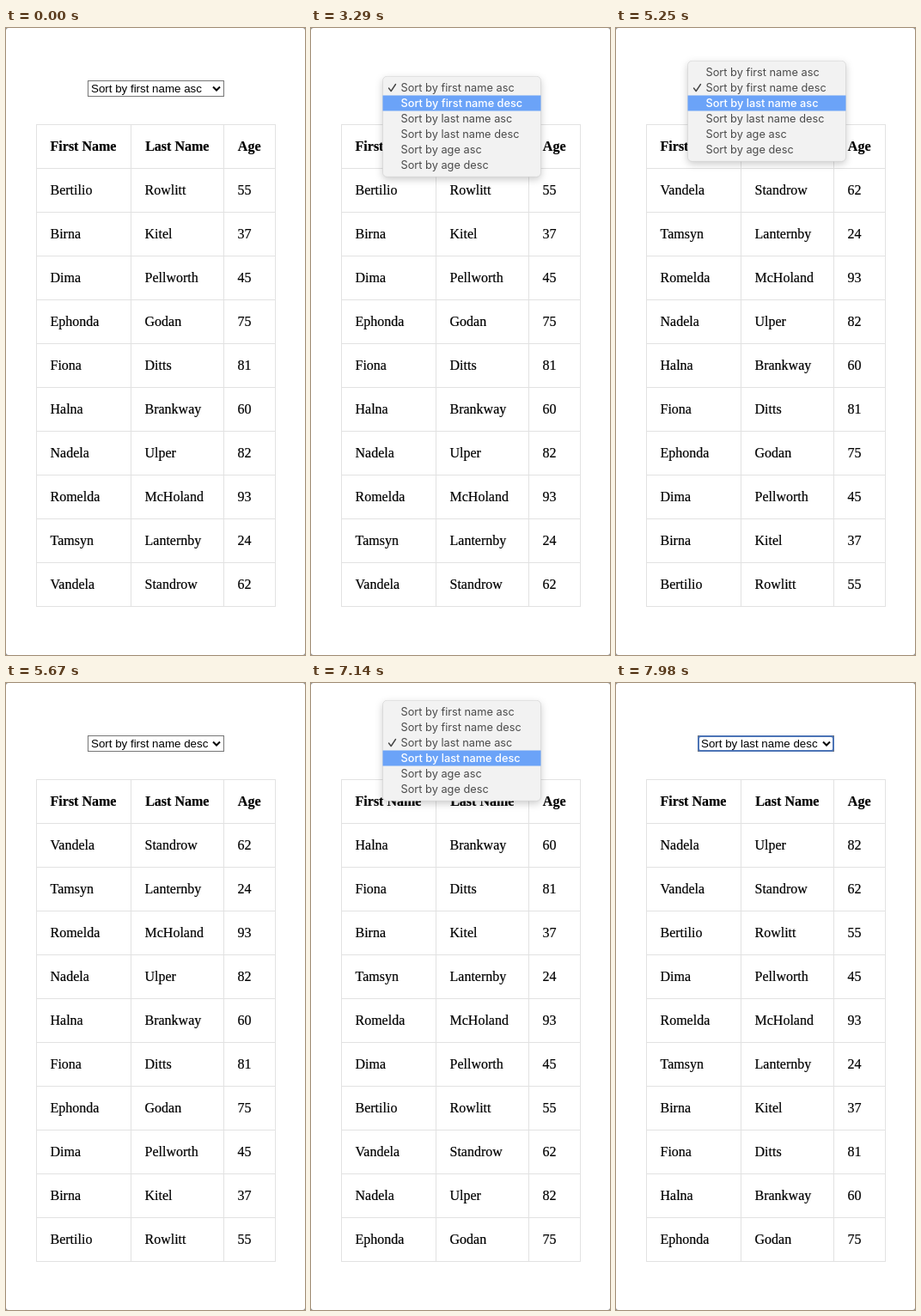
An HTML page that plays this animation: 348x730 px, repeating every 8000 ms.

```html
<!DOCTYPE html>
<html lang="en">
<head>
<meta charset="utf-8">
<title>Sortable table</title>
<style>
  html, body { margin: 0; width: 100%; height: 100%; overflow: hidden; background: #8a8a8a; }
  svg { display: block; width: 348px; height: 730px; }
  .table { font: 16px "Liberation Serif", "Times New Roman", serif; }
  .table text { stroke: #000; stroke-width: .2; }
  .head { font-weight: bold; text-anchor: middle; }
  .grid { fill: none; stroke: #e2e2e2; }
  .select { font: 13.333px "Liberation Sans", Arial, sans-serif; }
  .box { fill: #fff; stroke: #767676; }
  .hover .box { stroke: #4f4f4f; }
  .ring { fill: none; stroke: #4c74b6; stroke-width: 2; visibility: hidden; }
  .focus .ring { visibility: visible; }
  .menu { font: 12.78px Inter, "Open Sans", sans-serif; }
  .panel { fill: #f2f2f2; stroke: #c9c9c9; stroke-width: .5;
    filter: drop-shadow(0 3px 4px rgba(0, 0, 0, .2)); }
  .item rect { fill: none; }
  .item text { fill: #4b4b4b; }
  .item path { fill: none; stroke: #444; stroke-width: 1.4; visibility: hidden;
    stroke-linecap: round; stroke-linejoin: round; }
  .item.checked path { visibility: visible; }
  .item.on rect { fill: #6ba3f8; }
  .item.on text { fill: #fff; font-weight: 500; }
  .item.on path { stroke: #fff; }
</style>
</head>
<body>
<svg id="stage" viewBox="0 0 348 730"></svg>
<script>
const LOOP = 8000, STEP = 70, ROW = 51, ITEM = 18;
const COLUMNS = [51.5, 161.5, 269.5];

// Listed by first name, ascending.
const people = [
  ['Bertilio', 'Rowlitt', 55],
  ['Birna', 'Kitel', 37],
  ['Dima', 'Pellworth', 45],
  ['Ephonda', 'Godan', 75],
  ['Fiona', 'Ditts', 81],
  ['Halna', 'Brankway', 60],
  ['Nadela', 'Ulper', 82],
  ['Romelda', 'McHoland', 93],
  ['Tamsyn', 'Lanternby', 24],
  ['Vandela', 'Standrow', 62]
];

const labels = ['first name', 'last name', 'age']
  .flatMap(key => ['asc', 'desc'].map(dir => `Sort by ${key} ${dir}`));

// One person always stays at the end when sorting by last name.
const pinned = people[3];
const byLast = people.filter(p => p !== pinned).sort((a, b) => a[1] < b[1] ? -1 : 1);
// The last-name order follows the shown table, where Kitel precedes Lanternby.
const orders = [
  people,
  [...people].reverse(),
  [...byLast, pinned],
  [...byLast].reverse().concat([pinned])
];

// Each visit to the menu moves the choice from one entry to the next.
const visits = [
  { open: 1820, move: 2240, pick: 3430, closed: 3780 },
  { open: 4480, move: 4760, pick: 5390, closed: 5670 },
  { open: 6720, move: 7140, pick: 7630, closed: 7910 }
];

const stage = document.getElementById('stage');

function add(parent, tag, attrs = {}, text = '') {
  const el = document.createElementNS('http://www.w3.org/2000/svg', tag);
  for (const name in attrs) el.setAttribute(name, attrs[name]);
  el.textContent = text;
  return parent.appendChild(el);
}

add(stage, 'rect', { width: 348, height: 730, rx: 3, fill: '#fff' });

const table = add(stage, 'g', { class: 'table' });
let grid = '';
for (let i = 0; i < 12; i++) grid += `M35 ${112.5 + i * ROW}H314`;
for (const x of [35.5, 145.5, 253.5, 313.5]) grid += `M${x} 112V674`;
add(table, 'path', { class: 'grid', d: grid });
[['First Name', 90], ['Last Name', 199.3], ['Age', 283.2]].forEach(([name, x]) =>
  add(table, 'text', { class: 'head', x, y: 143 }, name));
const cells = people.map((_, row) => COLUMNS.map(x =>
  add(table, 'text', { x, y: 194 + row * ROW })));

const select = add(stage, 'g', { class: 'select' });
add(select, 'rect', { class: 'box', x: 95.5, y: 61.5, width: 158, height: 18 });
add(select, 'rect', { class: 'ring', x: 96, y: 62, width: 157, height: 17, rx: 2.5 });
const value = add(select, 'text', { x: 99, y: 75 });
add(select, 'path', { d: 'M241 68.5l4 4 4-4', fill: 'none', stroke: '#000', 'stroke-width': 2 });

const menu = add(stage, 'g', { class: 'menu' });
add(menu, 'rect', { class: 'panel', x: 83.5, y: 0.3, width: 184, height: 117, rx: 5 });
const items = labels.map((label, i) => {
  const item = add(menu, 'g', { transform: `translate(83.5 ${4.5 + i * ITEM})` });
  add(item, 'rect', { width: 184, height: ITEM });
  add(item, 'path', { d: 'M7 9.5l2.7 3.5 5.3-8' });
  add(item, 'text', { x: 21, y: 13.2 }, label);
  return item;
});

function stateAt(t) {
  const done = visits.filter(v => t >= v.closed + STEP).length;
  const state = {
    sort: done, on: -1, alpha: 0,
    focus: done > 0, hover: t >= 1050 && t < visits[0].open
  };
  const visit = visits[done];
  if (visit && t >= visit.open) {
    const { move, pick, closed } = visit;
    const fade = pick + STEP;
    state.focus = false;
    state.alpha = t < fade ? 1 : Math.max(0, (closed - t) / (closed - fade));
    if (t < pick || t >= fade) state.on = t < move ? done : done + 1;
  }
  return state;
}

function draw({ sort, on, alpha, focus, hover }) {
  orders[sort].forEach((person, row) =>
    person.forEach((text, col) => { cells[row][col].textContent = text; }));
  value.textContent = labels[sort];
  select.setAttribute('class', `select${focus ? ' focus' : ''}${hover ? ' hover' : ''}`);
  menu.setAttribute('transform', `translate(0 ${56 - sort * ITEM})`);
  menu.setAttribute('opacity', alpha);
  items.forEach((item, i) => item.setAttribute('class',
    `item${i === sort ? ' checked' : ''}${i === on ? ' on' : ''}`));
}

const start = performance.now();
let last = -1;

function tick() {
  const t = (performance.now() - start) % LOOP;
  const slot = Math.floor(t / STEP);
  if (slot !== last) draw(stateAt(slot * STEP));
  last = slot;
  requestAnimationFrame(tick);
}
tick();
</script>
</body>
</html>
```
